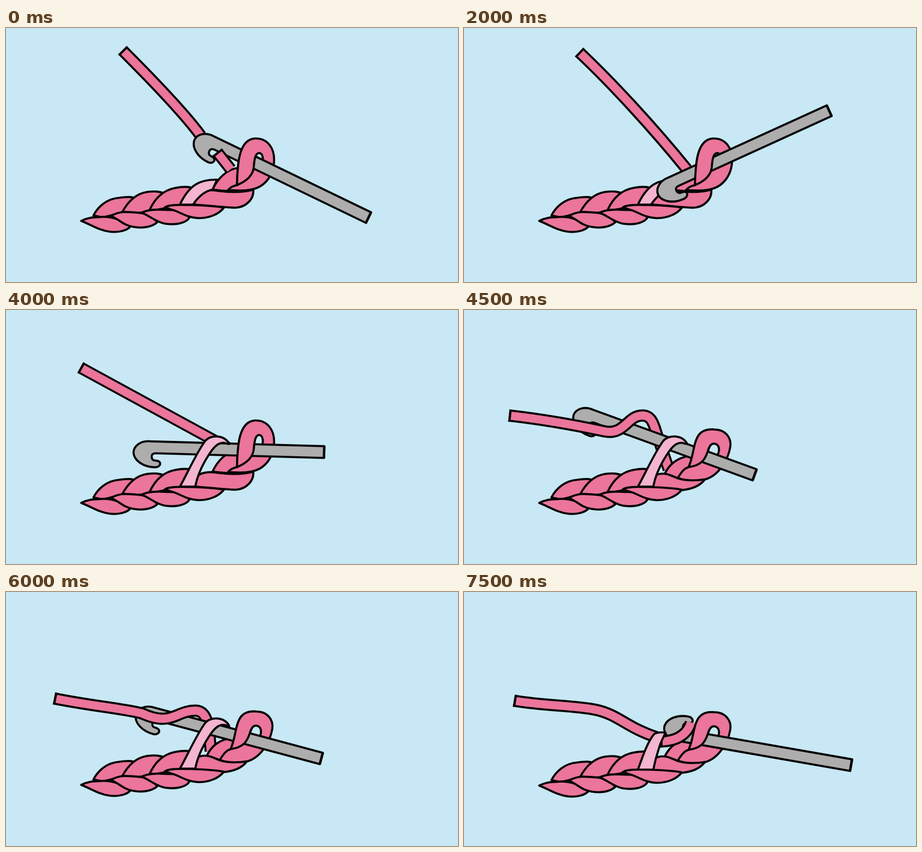
An HTML page with a canvas that plays this animation: 998x561 px, repeating every 8 s.

```html
<!DOCTYPE html>
<html lang="en">
<head>
<meta charset="utf-8">
<title>Crochet stitch</title>
<style>
html, body { margin: 0; width: 100%; height: 100%; overflow: hidden; background: #c7e8f4; }
canvas { display: block; width: 100%; height: 100%; }
</style>
</head>
<body>
<canvas id="stage" width="998" height="561"></canvas>
<script>
const ctx = document.getElementById('stage').getContext('2d');
const SKY = '#c7e8f4', PINK = '#eb759b', PALE = '#f3b5d0', GREY = '#adadad', INK = '#050505';
const STEP = 500;

// Chain parts, back to front
const backStrands = [
  'M193,414 C203,395 222,377 250,375 C270,372 280,373 290,377 L260,408 C240,410 230,416 212,418Z',
  'M256,408 C268,385 285,366 312,362 C330,360 340,361 352,366 L320,402 C300,411 280,408 256,406Z',
  'M317,402 C328,378 345,358 375,353 C392,350 402,350 410,353 L390,392 C360,392 340,404 317,402Z'
];
const frontStrands = [
  'M166,426 C185,416 200,419 214,417 C245,417 262,430 275,438 C268,447 250,452 230,450 C205,447 187,434 166,426Z',
  'M232,415 C252,403 270,406 300,409 C320,413 328,422 334,429 C322,440 300,443 280,439 C260,436 250,423 232,415Z',
  'M299,408 C320,398 345,402 365,402 C388,404 400,411 405,419 C397,431 375,436 350,432 C330,428 315,413 299,408Z',
  'M351,396 C362,389 390,391 410,391 C440,392 465,393 481,397 C470,411 450,420 425,420 C397,419 382,404 362,400Z'
];

const slack = {
  knot: 'M456,357 C466,335 486,312 512,309 L545,340 L492,360 C480,360 468,358 456,357Z',
  ring: 'M510,347 C511,300 514,246 550,244 C578,243 592,266 592,290 C592,325 572,352 540,357 C520,361 505,358 490,358 C497,350 503,349 510,347Z',
  hole: 'M549,312 C547,290 550,276 558,276 C568,276 568,290 566,298 C562,308 552,312 549,312Z',
  strand: 'M415,390 C420,375 422,365 430,362 C445,356 460,358 470,360 C495,363 525,363 546,357 C548,378 530,396 506,397 C480,396 450,392 415,390Z',
  band: 'M550,244 C514,246 511,300 510,347 C532,338 545,325 547,308 C548,296 549,278 558,276'
};
const tight = {
  knot: 'M443,362 C455,338 472,326 500,322 L515,350 L475,372 C465,369 455,364 443,362Z',
  ring: 'M496,347 C506,325 506,300 514,284 C522,264 540,263 553,264 C577,264 591,282 588,302 C583,333 561,366 533,374 C510,379 490,378 472,371 C480,358 486,350 496,347Z',
  hole: 'M537,318 C541,301 545,295 552,295 C563,296 566,308 560,320Z',
  strand: 'M411,392 C418,372 422,364 428,363 C445,358 458,366 470,371 C490,378 512,377 532,374 C520,390 500,397 475,398Z',
  band: 'M553,264 C540,263 522,264 514,284 C506,300 506,325 496,347 C525,343 532,330 538,313 C541,301 545,295 552,295'
};

// The pale strand that the hook goes under
const flat = 'M384,390 C405,345 430,334 466,335 L456,357 C440,360 425,372 413,390Z';
const raised = 'M390,390 C398,365 408,330 425,316 C438,306 458,310 467,316 C455,325 448,345 440,358 C432,370 428,380 428,391Z';
const tall = 'M384,390 C400,362 420,316 440,289 C452,275 482,275 493,296 L487,295 C470,288 457,305 447,321 C433,343 422,368 418,390Z';
const low = 'M384,391 C395,360 405,330 420,312 Q430,307 445,309 C440,320 434,330 430,345 C425,360 421,375 418,391Z';

const hookShape = 'M423,-20 L40,-20 C16,-22 2,-8 2,6 C4,24 25,37 50,37 C60,37 64,29 60,25 C55,19 46,26 43,17 C41,9 45,6 52,6 L423,6Z';

const steep = 'M254,53 C325,120 415,217 492,312';
const slanted = 'M164,127 L498,309';
// Yarn over the hook, up to the top of its arch, and the leg going down behind
const wrap = (x, y) => `M${x},${y} C170,241 240,253 310,268 C355,277 360,233 394,233`;
const leg = (x, y) => `M${x},${y} C${x + 18},${y} ${x + 24},${y + 15} ${x + 30},${y + 36} L452,352`;

// yarn: behind the hook, over: in front of it, hook: x, y, degrees, flipped
const poses = [
  { yarn: 'M257,49 C320,112 392,186 430,238', over: 'M466,274 L496,312', hook: [416.7, 241, 25.8] },
  { yarn: steep, hook: [408, 265, 15.5] },
  { yarn: steep, hook: [421, 305, 1] },
  { yarn: steep, hook: [430, 336, -14] },
  { yarn: steep, hook: [424.5, 364.4, -24.5] },
  { yarn: 'M180,106 L497,312', hook: [417, 367, -24], pale: raised },
  { yarn: slanted, hook: [378.8, 372.4, -21.8], pale: raised },
  { yarn: slanted, hook: [349, 350, -13], pale: tall },
  { yarn: slanted, hook: [279.6, 309, 1.6], pale: tall },
  { under: leg(394, 233), over: wrap(99, 233), hook: [242, 226, 20], pale: tall, form: tight },
  { under: leg(394, 233), over: wrap(97, 233), hook: [251.5, 204, 25.9], pale: tall, form: tight, shift: [-2, 1] },
  { under: leg(394, 233), over: wrap(107, 235), hook: [249, 230, 21], pale: tall, form: tight },
  { under: leg(418, 262), over: 'M106,235 C190,252 250,256 300,268 C365,298 375,262 418,262',
    hook: [286, 265, 15], pale: tall, form: tight },
  { yarn: 'M118,236 C190,255 250,252 300,260 C335,265 352,276 374,292', under: 'M430,280 L472,337',
    over: 'M398,316 C408,285 425,264 455,280', hook: [345.8, 295.4, 9.8], pale: tall, form: tight, shift: [0, -1] },
  { yarn: 'M94,227 C170,245 240,250 290,258 C340,268 365,290 412,314', over: 'M410,324 C453,325 473,305 479,283',
    hook: [411, 311, 10, true], pale: tall, form: tight },
  { yarn: 'M110,240 C180,252 240,250 290,260 C340,270 360,300 426,321', over: 'M433,330 C475,330 495,310 501,288',
    hook: [436.9, 316.6, 9.9, true], pale: low, form: tight, shift: [0, 1.5] }
];

function shape(d, color) {
  const path = new Path2D(d);
  ctx.fillStyle = color;
  ctx.fill(path);
  ctx.strokeStyle = INK;
  ctx.lineWidth = 4.6;
  ctx.stroke(path);
}

function rope(d, cap) {
  const path = new Path2D(d);
  const line = (color, width) => {
    ctx.strokeStyle = color;
    ctx.lineWidth = width;
    ctx.stroke(path);
  };
  line(INK, 27);
  line(PINK, 18);
  if (cap) {
    ctx.setLineDash([5, 2000]);
    line(INK, 27);
    ctx.setLineDash([]);
  }
}

function drawHook([x, y, degrees, flipped]) {
  ctx.save();
  ctx.translate(x, y);
  ctx.rotate(degrees * Math.PI / 180);
  if (flipped) ctx.transform(1, 0, 0, -1, 0, -14);
  shape(hookShape, GREY);
  ctx.fillStyle = INK;
  ctx.fillRect(420, -20, 5.5, 26);
  ctx.restore();
}

function drawPose({ yarn, under, over, hook, pale = flat, form = slack, shift = [0, 0] }) {
  const chain = draw => {
    ctx.save();
    ctx.translate(...shift);
    draw();
    ctx.restore();
  };
  ctx.fillStyle = SKY;
  ctx.fillRect(0, 0, 998, 561);
  if (under) rope(under);
  if (yarn) rope(yarn, true);
  chain(() => {
    backStrands.forEach(d => shape(d, PINK));
    shape(form.knot, PINK);
    shape(form.ring, PINK);
    shape(form.hole, SKY);
    shape(form.strand, PINK);
    if (pale === flat) shape(pale, PALE);
  });
  drawHook(hook);
  if (over) rope(over, true);
  chain(() => {
    if (pale !== flat) shape(pale, PALE);
    shape(form.band, PINK);
    frontStrands.forEach(d => shape(d, PINK));
  });
}

ctx.lineJoin = 'round';
function tick() {
  drawPose(poses[Math.floor(performance.now() / STEP) % poses.length]);
  requestAnimationFrame(tick);
}
tick();
</script>
</body>
</html>
```
